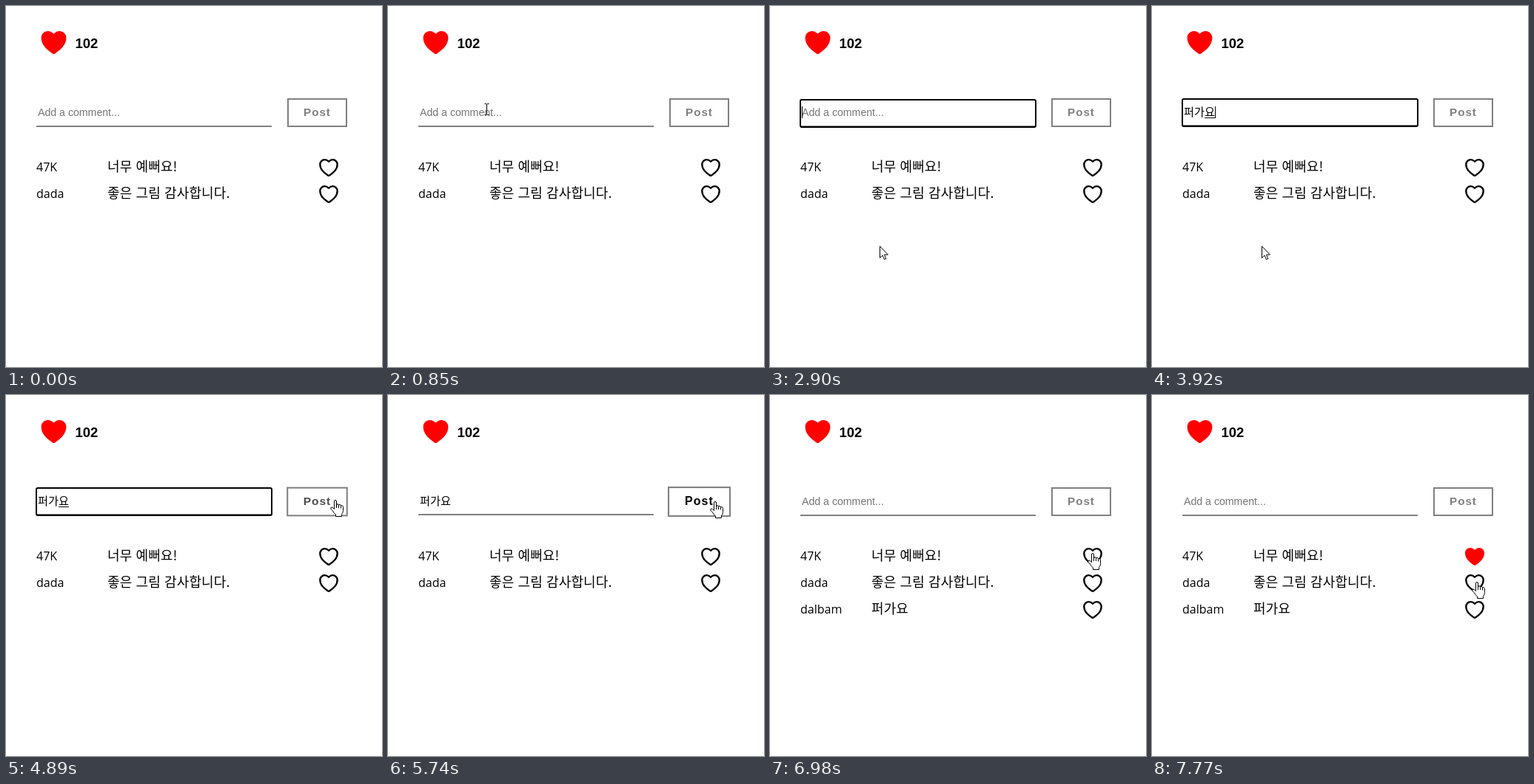
These frames come from a looping animation (508 px wide and 489 px high, 8000 ms). An HTML page with a canvas:

```html
<!DOCTYPE html>
<html lang="ko">
<head>
<meta charset="utf-8">
<style>
html, body { margin: 0; width: 100%; height: 100%; overflow: hidden; background: #fff; }
canvas { display: block; width: 508px; height: 489px; }
</style>
</head>
<body>
<canvas id="stage"></canvas>
<script>
const W = 508, H = 489, LOOP = 8000, STEP = 50;
const canvas = document.getElementById('stage');
const ctx = canvas.getContext('2d');
const dpr = window.devicePixelRatio || 1;
canvas.width = W * dpr;
canvas.height = H * dpr;

const ARIAL = '"Liberation Sans", Arial, sans-serif';
const LATIN = '16px "Open Sans", sans-serif';
const HANGUL = '"Noto Sans CJK KR", "Noto Sans CJK", sans-serif';
const GREY = '#808080';

const FOCUS = 1120, BLUR = 5740, POSTED = 5840, LIKED = 7520;
const HOVER_IN = 4840, HOVER_OUT = 6480, HOVER_MS = 200;

const comments = [
  ['47K', '너무 예뻐요!'],
  ['dada', '좋은 그림 감사합니다.'],
  ['dalbam', '퍼가요']
];

// Input value after each key press, as composed by the input method
const edits = [
  [FOCUS, ''], [2480, 'ㅍ'], [2530, '퍼'], [2750, 'ㅍ'], [2900, ''],
  [3250, 'ㅍ'], [3350, '퍼'], [3650, '퍽'], [3740, '퍼가'],
  [3830, '퍼강'], [3920, '퍼가요'], [POSTED, '']
];

// Pointer path: time, x, y of the hot spot
const path = [
  [350, 388, 195], [900, 108, 135], [1120, 108, 135], [1370, 126, 258],
  [1520, 148, 325], [4420, 148, 325], [4520, 158, 340], [4790, 464, 175],
  [4840, 455, 155], [4890, 445, 142], [5040, 443, 143], [5690, 443, 143],
  [5840, 440, 146], [6060, 440, 146], [6310, 426, 145], [6600, 431, 188],
  [6880, 435, 213], [6930, 434, 213], [6980, 436, 214], [7520, 436, 214],
  [7570, 437, 203], [7670, 438, 226], [7770, 439, 253]
];

const heartShape = new Path2D('M0 2.9C1.4 1.4 3.3 0 6.1 0C9.9 0 13 3.2 13 7C13 10.4 11.8 13.6 9.3 16.6' +
  'C8.2 18 6 20.3 1.1 23.6Q0 24.2-1.1 23.6C-6 20.3-8.2 18-9.3 16.6C-11.8 13.6-13 10.4-13 7' +
  'C-13 3.2-9.9 0-6.1 0C-3.3 0-1.4 1.4 0 2.9Z');
const arrowShape = new Path2D('M.5 .5V16.2L4.1 12.8L6.5 18.3L8.8 17.3L6.5 11.9H11.4Z');
const handShape = new Path2D('M5.5 12.5V2Q5.5 .5 7 .5Q8.5 .5 8.5 2V7Q8.7 5.7 10 5.7Q11.5 5.7 11.5 7.3' +
  'Q11.8 6.4 13 6.4Q14.5 6.5 14.5 8.3Q14.9 7.6 16 7.7Q17.5 8 17.5 9.7V14.5Q17.5 17.3 15.5 19.5V22.5' +
  'H7.5V20Q5 18 3.5 15L.8 12.2Q.2 10.5 2 10Q3.5 10 5.5 12.5Z');
const fingerLines = new Path2D('M8.5 7V11M11.5 7.3V11M14.5 8.3V11.5');
const beamShape = new Path2D('M-3 -7.5H-1L0 -7L1 -7.5H3M0 -7V7M-3 7.5H-1L0 7L1 7.5H3');

const clamp01 = v => Math.min(1, Math.max(0, v));
const smooth = v => Math.sin(clamp01(v) * Math.PI / 2);

function text(str, x, y, font, color = '#000', spacing = 0) {
  ctx.font = font;
  ctx.fillStyle = color;
  ctx.letterSpacing = spacing + 'px';
  ctx.fillText(str, x, y);
}

function heart(cx, top, scale, filled) {
  ctx.save();
  ctx.translate(cx, top);
  ctx.scale(scale, scale);
  if (filled) {
    ctx.fillStyle = '#f00';
    ctx.fill(heartShape);
  } else {
    ctx.translate(0, 1.2);
    ctx.scale(0.9, 0.9);
    ctx.lineWidth = 2.6;
    ctx.lineJoin = 'round';
    ctx.strokeStyle = '#000';
    ctx.stroke(heartShape);
  }
  ctx.restore();
}

function drawInput(t) {
  const [since, value] = edits.filter(e => e[0] <= t).pop() || [0, ''];
  const focused = t >= FOCUS && t < BLUR;
  const top = value ? 125 : 126;

  ctx.fillStyle = GREY;
  ctx.fillRect(41, top + 36, 318, 2);
  if (focused) {
    ctx.strokeStyle = '#000';
    ctx.lineWidth = 2;
    ctx.beginPath();
    ctx.roundRect(41, top + 1, 318, 37, 2);
    ctx.stroke();
  }

  if (value) text(value, 43, 149, '300 15.2px ' + HANGUL);
  else text('Add a comment...', 43, 149, '14.15px ' + ARIAL, '#757575');

  if (!focused) return;
  const end = 43 + 14 * value.length;
  ctx.fillStyle = '#000';
  if (value) ctx.fillRect(end - 14, 151, 14, 1);
  const idle = t - since;
  if (idle < 550 || Math.floor((idle - 550) / 510) % 2) ctx.fillRect(end, 136, 1, 16);
}

function drawButton(t) {
  const hover = smooth((t - HOVER_IN) / HOVER_MS) - smooth((t - HOVER_OUT) / HOVER_MS);
  const shade = Math.round(128 * (1 - hover));
  const scale = 1 + 0.05 * hover;
  ctx.save();
  ctx.translate(420.5, 144.5);
  ctx.scale(scale, scale);
  ctx.translate(-420.5, -144.5);
  ctx.strokeStyle = GREY;
  ctx.lineWidth = 2;
  ctx.strokeRect(381, 126, 79, 37);
  text('Post', 402, 149, 'bold 15.2px ' + ARIAL, `rgb(${shade},${shade},${shade})`, 1);
  ctx.restore();
}

function drawComments(t) {
  const count = t < POSTED ? 2 : 3;
  comments.slice(0, count).forEach(([name, body], i) => {
    const y = 224 + 36 * i;
    text(name, 41, y, LATIN);
    ctx.wordSpacing = '1px';
    text(body, 137, y, '300 18px ' + HANGUL, '#000', 0.12);
    ctx.wordSpacing = '0px';
    heart(436, y - 17, 1, i === 0 && t >= LIKED);
  });
}

function pointerAt(t) {
  const next = path.findIndex(p => p[0] > t);
  if (next < 0) return path[path.length - 1].slice(1);
  const [t0, x0, y0] = path[next - 1];
  const [t1, x1, y1] = path[next];
  const k = Math.floor((t - t0) / STEP) * STEP / (t1 - t0);
  return [x0 + (x1 - x0) * k, y0 + (y1 - y0) * k].map(Math.round);
}

function pointerKind(x, y) {
  const within = (l, t, r, b) => x >= l && x <= r && y >= t && y <= b;
  if (within(41, 126, 359, 164)) return 'beam';
  if (within(379, 124, 462, 165)) return 'hand';
  if (within(423, 201, 449, 306) && (y - 201) % 36 < 31) return 'hand';
  return 'arrow';
}

function drawPointer(t) {
  if (t < path[0][0]) return;
  const [x, y] = pointerAt(t);
  const kind = pointerKind(x, y);
  ctx.save();
  ctx.lineWidth = 1;
  ctx.lineJoin = 'round';
  ctx.strokeStyle = '#000';
  ctx.fillStyle = '#fff';
  if (kind === 'beam') {
    ctx.translate(x + 0.5, y);
    ctx.stroke(beamShape);
  } else {
    ctx.translate(kind === 'hand' ? x - 7 : x, y);
    const shape = kind === 'hand' ? handShape : arrowShape;
    ctx.fill(shape);
    ctx.stroke(shape);
    if (kind === 'hand') ctx.stroke(fingerLines);
  }
  ctx.restore();
}

function draw() {
  const t = performance.now() % LOOP;
  ctx.setTransform(dpr, 0, 0, dpr, 0, 0);
  ctx.fillStyle = '#fff';
  ctx.fillRect(0, 0, W, H);
  heart(64.5, 34, 1.3, true);
  text('102', 93.5, 57, 'bold 18.5px ' + ARIAL);
  drawInput(t);
  drawButton(t);
  drawComments(t);
  drawPointer(t);
  requestAnimationFrame(draw);
}
draw();
</script>
</body>
</html>
```
